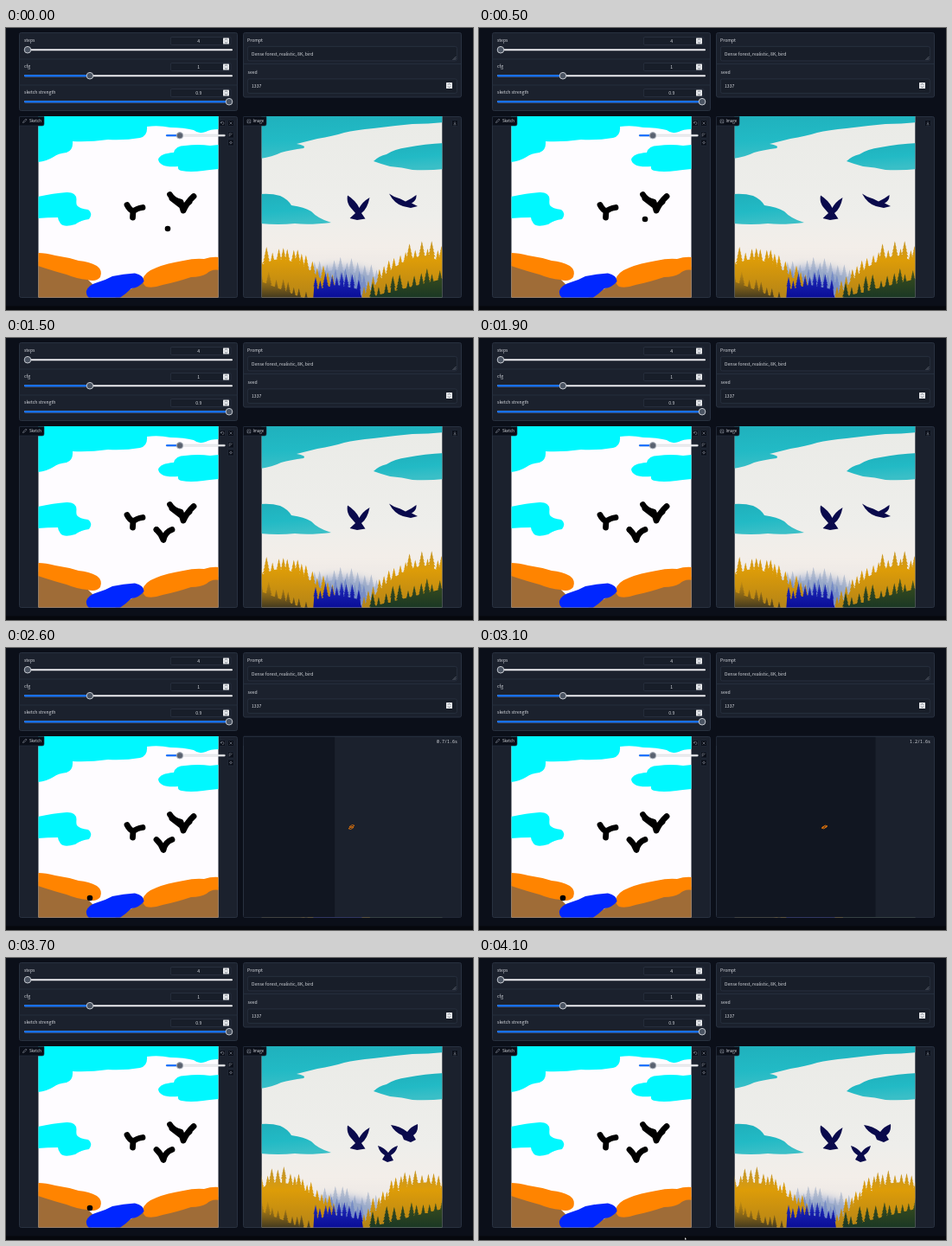
An HTML page that plays this animation: 540 by 326 pixels, repeating every 4200 ms.

```html
<!DOCTYPE html>
<html lang="en">
<head>
<meta charset="utf-8">
<title>Sketch to image</title>
<style>
  html, body { margin: 0; width: 100%; height: 100%; overflow: hidden; background: #0b0f19; }
  svg { display: block; }
  text { font: 5.1px "Noto Sans CJK JP", "Noto Sans CJK SC", "Noto Sans", sans-serif; fill: #d8dbe0; }
  .mid { text-anchor: middle; }
  .small { font-size: 4.4px; }
  .panel { fill: #1b212d; stroke: #283140; }
  .field { fill: #181e29; stroke: #2d3645; stroke-width: .7; }
  .rule { stroke: #283140; stroke-width: .8; }
  .tag { fill: #0b0f19; stroke: #283140; stroke-width: .6; }
  .icon { fill: none; stroke: #9aa1ad; stroke-width: .5; }
  .brush { fill: none; stroke: #000; stroke-width: 6.8; stroke-linecap: round; stroke-linejoin: round; }
  .timer { font: 5px "Noto Sans Mono", "DejaVu Sans Mono", monospace; text-anchor: end; }
</style>
</head>
<body>
<svg width="540" height="326" viewBox="0 0 540 326">
  <defs>
    <clipPath id="canvasClip"><rect x="37.5" y="102" width="208" height="209.5"/></clipPath>
    <clipPath id="photoClip"><rect x="295.7" y="102" width="208.6" height="209.5"/></clipPath>
    <linearGradient id="sky" x2="0" y2="1">
      <stop offset="0" stop-color="#eaebe7"/><stop offset=".55" stop-color="#eeeeeb"/>
      <stop offset=".72" stop-color="#f3eee9"/><stop offset="1" stop-color="#e4e0e0"/>
    </linearGradient>
    <linearGradient id="teal" x2=".2" y2="1">
      <stop offset="0" stop-color="#1fb0bc"/><stop offset=".6" stop-color="#22bac5"/><stop offset="1" stop-color="#3abfc7"/>
    </linearGradient>
    <linearGradient id="gold" gradientUnits="userSpaceOnUse" x1="0" y1="245" x2="0" y2="311">
      <stop offset="0" stop-color="#c3962c"/><stop offset=".35" stop-color="#dd9c08"/><stop offset="1" stop-color="#b58417"/>
    </linearGradient>
    <linearGradient id="blue" gradientUnits="userSpaceOnUse" x1="0" y1="276" x2="0" y2="311">
      <stop offset="0" stop-color="#4a60b8"/><stop offset=".5" stop-color="#1720ae"/><stop offset="1" stop-color="#0a0e98"/>
    </linearGradient>
    <linearGradient id="pine" gradientUnits="userSpaceOnUse" x1="0" y1="270" x2="0" y2="311">
      <stop offset="0" stop-color="#6e6718"/><stop offset=".5" stop-color="#31471f"/><stop offset="1" stop-color="#1b3824"/>
    </linearGradient>
    <linearGradient id="shade" gradientUnits="userSpaceOnUse" x1="0" y1="280" x2="0" y2="311">
      <stop offset="0" stop-color="#7a5a18" stop-opacity=".1"/><stop offset="1" stop-color="#40381f" stop-opacity=".95"/>
    </linearGradient>
    <filter id="soft"><feGaussianBlur stdDeviation=".5"/></filter>
    <filter id="mist" x="-30%" y="-30%" width="160%" height="160%"><feGaussianBlur stdDeviation="5"/></filter>
  </defs>

  <rect width="540" height="326" fill="#0b0f19"/>
  <rect y="321.5" width="540" height="4.5" fill="#06080d"/>

  <rect class="panel" x="15.5" y="5.5" width="252" height="90" rx="2"/>
  <path class="rule" d="M15.5 36H267.5M15.5 66H267.5"/>
  <g id="sliders"></g>

  <rect class="panel" x="274.5" y="5.5" width="252" height="74.5" rx="2"/>
  <path class="rule" d="M274.5 41.5H526.5"/>
  <text x="279" y="15.7">Prompt</text>
  <rect class="field" x="279.4" y="21.4" width="242" height="16.5" rx="2"/>
  <text x="284" y="31.7">Dense forest, realistic, 8K, bird</text>
  <path class="icon" d="M516.5 37L520.5 33M518.5 37L520.5 35"/>
  <text x="279.5" y="52.7">seed</text>
  <rect class="field" x="279.4" y="58.9" width="242" height="16.5" rx="2"/>
  <text x="284" y="68.7">1337</text>
  <g id="seedSpin"></g>

  <rect class="panel" x="15.5" y="102.5" width="252" height="209" rx="2"/>
  <g clip-path="url(#canvasClip)">
    <rect x="37" y="101" width="210" height="212" fill="#fefcff"/>
    <g fill="#00f8ff">
      <path d="M37 101H247V117Q236 117 231 120Q223 123 217 118Q205 115 190 115Q176 112 163 114Q164 125 155 127Q138 130 118 129Q96 132 77 131Q78 141 70 144Q60 145 55 149Q47 154 37 155Z"/>
      <path d="M176 152Q178 145 194 144Q196 136 207 136Q222 134 236 136L247 135V163Q235 164 228 165Q213 167 203 165Q198 164 199 160Q178 162 176 152Z"/>
      <path d="M37 195Q55 191 70 190Q81 189.500 81.500 198Q81 203 82 205Q85 209 95 210Q101 214 96 221Q87 222 80 227Q67 231 63 226Q60 222 60 219Q48 219 37 220Z"/>
    </g>
    <path fill="#9f6c37" d="M37 270L92 288L104 300L98 313H37ZM124 313L160 293L205 288L247 276V313Z"/>
    <g fill="#ff8400">
      <path d="M37 260Q46 260 57 263Q71 265 84 269Q96 270 105 275Q112 280 109 288Q104 294 94 291Q82 290 70 285Q55 281 37 275Z"/>
      <path d="M158 291Q160 282 174 277Q186 272 205 269Q218 266 229 267Q238 264 247 265V280Q238 278 232 284Q225 288 214 288Q196 294 181 297Q170 301 162 299Q158 296 158 291Z"/>
    </g>
    <path fill="#0026ff" d="M93 304Q95 297 106 294Q116 291 123 287Q136 284 149 283.500Q160 286 159.500 293Q154 300 145 301Q138 308 130 313H97Q92 309 93 304Z"/>
    <path class="brush" d="M140 204.500Q143 210.500 147 211.500L146.500 219M147 212Q151 208.500 158 207.500"/>
    <path class="brush" d="M189.500 192.500Q193 199 202 201L205 211Q209 202 217 194.500M192 197L205 207L212 201"/>
    <path class="brush" id="stroke" pathLength="1" d="M192 221.500Q184 224 182 233.500Q179 226 174 221.500"/>
    <circle id="dot" r="3.300"/>
  </g>
  <path class="tag" d="M15.500 102.500H44V111Q44 113 42 113H15.500Z"/>
  <path class="icon" d="M19.500 109.500L20 108L23 105L24.100 106.100L21 109.100Z"/>
  <text class="small" x="27" y="109.300">Sketch</text>
  <g id="buttons"></g>
  <rect x="185" y="123.200" width="68.500" height="2" rx="1" fill="#f3f3f5" stroke="#b9bbc2" stroke-width=".4"/>
  <rect x="185" y="123.200" width="16" height="2" rx="1" fill="#0066ff"/>
  <circle cx="201" cy="124.300" r="3.700" fill="#5a6270" stroke="#aab0ba"/>

  <rect class="panel" x="274.5" y="102.5" width="252" height="209" rx="2"/>
  <g clip-path="url(#photoClip)">
    <rect x="295" y="101" width="211" height="212" fill="url(#sky)"/>
    <g filter="url(#soft)" fill="url(#teal)">
      <path d="M294 99H507V109Q488 111 470 111Q448 113 425 116Q404 118 391 121Q378 125 360 128Q348 131 336 134Q348 136 344 139Q329 141 318 144Q308 149 294 151Z"/>
      <path d="M425 154Q431 148 440 146Q449 140 464 138Q484 134 507 133V163Q488 165 470 164Q458 161 444 160Q433 157 425 154Z"/>
      <path d="M294 192Q307 191 317 194Q326 198 330 205Q345 207 353 212Q360 220 376 225Q350 228 334 226Q315 228 294 226Z"/>
    </g>
    <g id="before"></g>
    <g id="after"></g>
  </g>
  <path class="tag" d="M274.500 102.500H301V111Q301 113 299 113H274.500Z"/>
  <path class="icon" d="M279 106H282.800V109.800H279ZM279 109L280.500 107.500L282.800 109.300"/>
  <text class="small" x="285.500" y="109.300">Image</text>
  <g id="save"></g>

  <g id="overlay">
    <rect x="275" y="101.500" width="251" height="210" fill="#1b212d"/>
    <g id="progress">
      <rect id="bar" x="275" y="102.500" height="208.500" fill="#111621"/>
      <g fill="none" stroke="#f07a0a" stroke-width=".8" stroke-linejoin="round">
        <path id="top" d="M-3 .7L.5 -1.500L3 -.7L-.5 1.500Z"/>
        <path id="bottom" d="M-3 .7L.5 -1.500L3 -.7L-.5 1.500Z"/>
      </g>
      <text class="timer" id="timer" x="522" y="109.700"></text>
    </g>
    <path class="rule" d="M275 102.500H526"/>
  </g>
  <path id="cursor" d="M0 0V3L.8 2.300L2.200 2.200Z" fill="#e8e8e8"/>
</svg>

<script>
const LOOP = 4200, STEP = 100, RUN = 1930, ETA = 1600, DONE = 3300;
const $ = id => document.getElementById(id);
const clamp = v => Math.min(1, Math.max(0, v));

// Linear interpolation through [time, value...] keys
function track(keys, t) {
  let i = 0;
  while (i < keys.length - 2 && t >= keys[i + 1][0]) i++;
  const [a, b] = [keys[i], keys[i + 1]];
  const k = clamp((t - a[0]) / (b[0] - a[0]));
  return a.slice(1).map((v, n) => v + (b[n + 1] - v) * k);
}

const spinner = (x, y) => `<rect x="${x}" y="${y}" width="7" height="7" rx=".6" fill="#e9ebee"/>
  <path d="M${x + 2} ${y + 2.7}l1.5 -1.5l1.5 1.5M${x + 2} ${y + 4.4}l1.5 1.5l1.5 -1.5" fill="none" stroke="#59606c" stroke-width=".8"/>`;

const slider = (label, value, y, end) => `
  <text x="21" y="${y + 1.7}">${label}</text>
  <rect class="field" x="190.4" y="${y - 4}" width="69.6" height="9" rx="1.5"/>
  <text class="mid" x="222.7" y="${y + 2.5}">${value}</text>${spinner(251, y - 3)}
  <rect x="21" y="${y + 9.7}" width="241" height="2" rx="1" fill="#ececf0"/>
  <rect x="21" y="${y + 9.7}" width="${end - 21}" height="2" rx="1" fill="#0066ff"/>
  <circle cx="${end}" cy="${y + 10.7}" r="3.8" fill="#4b5462" stroke="#c3c7ce"/>`;

const button = (x, y, icon) => `<rect class="tag" x="${x - 3.5}" y="${y - 3.5}" width="7" height="7" rx="1"/>
  <path class="icon" transform="translate(${x} ${y})" d="${icon}"/>`;

$('sliders').innerHTML = slider('steps', '4', 14.5, 25) + slider('cfg', '1', 44.5, 97) + slider('sketch strength', '0.9', 74.5, 258);
$('seedSpin').innerHTML = spinner(509, 63);
$('buttons').innerHTML =
  button(250, 110, 'M-1.5 -1.5V0H0M-1.5 0A1.7 1.7 0 1 1 0 1.7') +
  button(260, 110, 'M-1.5 -1.5L1.5 1.5M1.5 -1.5L-1.5 1.5') +
  button(260, 123.5, 'M-1.8 1.8L1.8 -1.8M-1.8 1.8V-1.5H.5') +
  button(260, 132.5, 'M-1.6 0L0 -1.6L1.6 0L0 1.6ZM-.5 0H.5');
$('save').innerHTML = button(519, 110, 'M0 -1.8V.8M-1 -.2L0 .8L1 -.2M-1.6 1.8H1.6');

function random(seed) {
  return () => (seed = (seed * 16807) % 2147483647) / 2147483647;
}

function fir(x, y, w) {
  const tiers = 5, h = w * 4, left = [], right = [];
  for (let i = 1; i <= tiers; i++) {
    const yy = y + h * i / tiers, r = w * i / tiers;
    right.push(`${x + r} ${yy}`, `${x + r * .6} ${yy - .4}`);
    left.unshift(`${x - r * .6} ${yy - .4}`, `${x - r} ${yy}`);
  }
  return `M${x} ${y}L${right.join('L')}L${x + w} 313H${x - w}L${left.join('L')}Z`;
}

// A line of firs standing on a filled hill
function row(rnd, from, to, gap, peak, rough, w, fill, extra = '') {
  let trees = '', hill = `M${from} 313`;
  for (let x = from; x <= to; x += gap * (.7 + rnd() * .6)) {
    trees += fir(x, peak(x) + rnd() * rough, w * (.8 + rnd() * .5));
    hill += `L${x} ${Math.min(313, peak(x) + rough + 8)}`;
  }
  return `<path d="${hill}L${to} 313Z${trees}" fill="${fill}" ${extra}/>`;
}

function forest(seed, lift) {
  const rnd = random(seed);
  const left = x => 248 - lift + (x > 312 ? (x - 312) ** 2 / 120 : (312 - x) * .4);
  const right = x => 244 - lift / 2 + (x < 488 ? (488 - x) ** 2 / 110 : (x - 488) * .5);
  const valley = k => x => k + Math.abs(x - 383) * .2;
  return '<ellipse cx="385" cy="294" rx="44" ry="18" fill="#8ea2cf" opacity=".8" filter="url(#mist)"/><g filter="url(#soft)">' +
    row(rnd, 342, 432, 7, valley(262), 9, 3.6, '#8fa0c0', 'opacity=".55"') +
    row(rnd, 350, 416, 6, valley(274), 8, 3.4, '#6f86c6', 'opacity=".8"') +
    row(rnd, 295, 382, 6, left, 11, 4.2, 'url(#gold)') +
    row(rnd, 414, 508, 6, right, 11, 4.2, 'url(#gold)') +
    row(rnd, 358, 412, 6, valley(280), 9, 3.2, 'url(#blue)') +
    row(rnd, 295, 350, 7, x => 276 + (x - 295) * .4, 9, 3.6, 'url(#shade)') +
    row(rnd, 424, 508, 8, x => 270 + (505 - x) * .25, 12, 4, 'url(#pine)') + '</g>';
}

const flock = d => `<path d="${d}" fill="#0a0a4c" filter="url(#soft)"/>`;
const first = 'M395 193.500Q393.500 201 398 207L404 214L397.500 220L406 222L415.500 220.500L411 214Q418 209 420.500 196Q412 201 408.500 208Q404 199 395 193.500Z';
$('before').innerHTML = forest(71, 0) +
  flock(first + 'M443 191.500Q449 196 456 197.500L462 200.500Q468 198 474.500 193Q475 199 469 202.500L476 206L468 208L459 206Q449 203 443 191.500Z');
$('after').innerHTML = forest(402, 8) +
  flock(first + 'M445 193Q449 201 458 205L460 210L468 213L474 210L471 205Q477 201 476 192Q468 195 464 201Q455 194 445 193Z' +
    'M430 217Q432 225 438 228L435 233L441 236L448 234L445 228Q451 225 453 217Q446 219 442 225Q437 219 430 217Z');

const pointer = [[0, 187, 232], [500, 192, 221], [600, 192, 221.5], [1000, 182, 233.5], [1500, 174, 221.5],
  [1900, 174, 221.5], [2500, 97, 289], [3700, 97, 289], [4100, 238, 323]];
const drawn = [[600, 0], [1000, .53], [1500, 1]];
const cover = [[1900, 0], [2100, 1], [DONE, 1], [3400, .78], [3600, 0]];
const sway = [[0, 1.25, 1.4], [250, -1.25, 1.4], [500, -1.25, 0], [750, 1.25, 0], [1000, 1.25, 1.4]];

const place = (id, x, y) => $(id).setAttribute('transform', `translate(${x} ${y})`);
const show = (id, on) => $(id).style.display = on ? '' : 'none';

function draw(t) {
  const [x, y] = track(pointer, t);
  place('dot', x, y);
  place('cursor', x, y);
  show('cursor', y > 311);

  const [ink] = track(drawn, t);
  show('stroke', ink > 0);
  $('stroke').setAttribute('stroke-dasharray', ink < 1 ? `${ink} 2` : 'none');

  show('before', t < DONE);
  show('after', t >= DONE);

  $('overlay').setAttribute('opacity', track(cover, t)[0]);
  show('progress', t > RUN && t <= DONE);
  const spent = Math.max(0, t - RUN);
  $('bar').setAttribute('width', 251 * clamp(spent / ETA));
  $('timer').textContent = `${(spent / 1000).toFixed(1)}/${(ETA / 1000).toFixed(1)}s`;
  const [dx, dy] = track(sway, spent % 1000);
  place('top', 399.5 + dx, 206 + dy);
  place('bottom', 399.5 - dx, 208 - dy);
}

const start = performance.now();
function tick() {
  const t = (performance.now() - start) % LOOP;
  draw(Math.floor(t / STEP) * STEP);
  requestAnimationFrame(tick);
}
tick();
</script>
</body>
</html>
```
